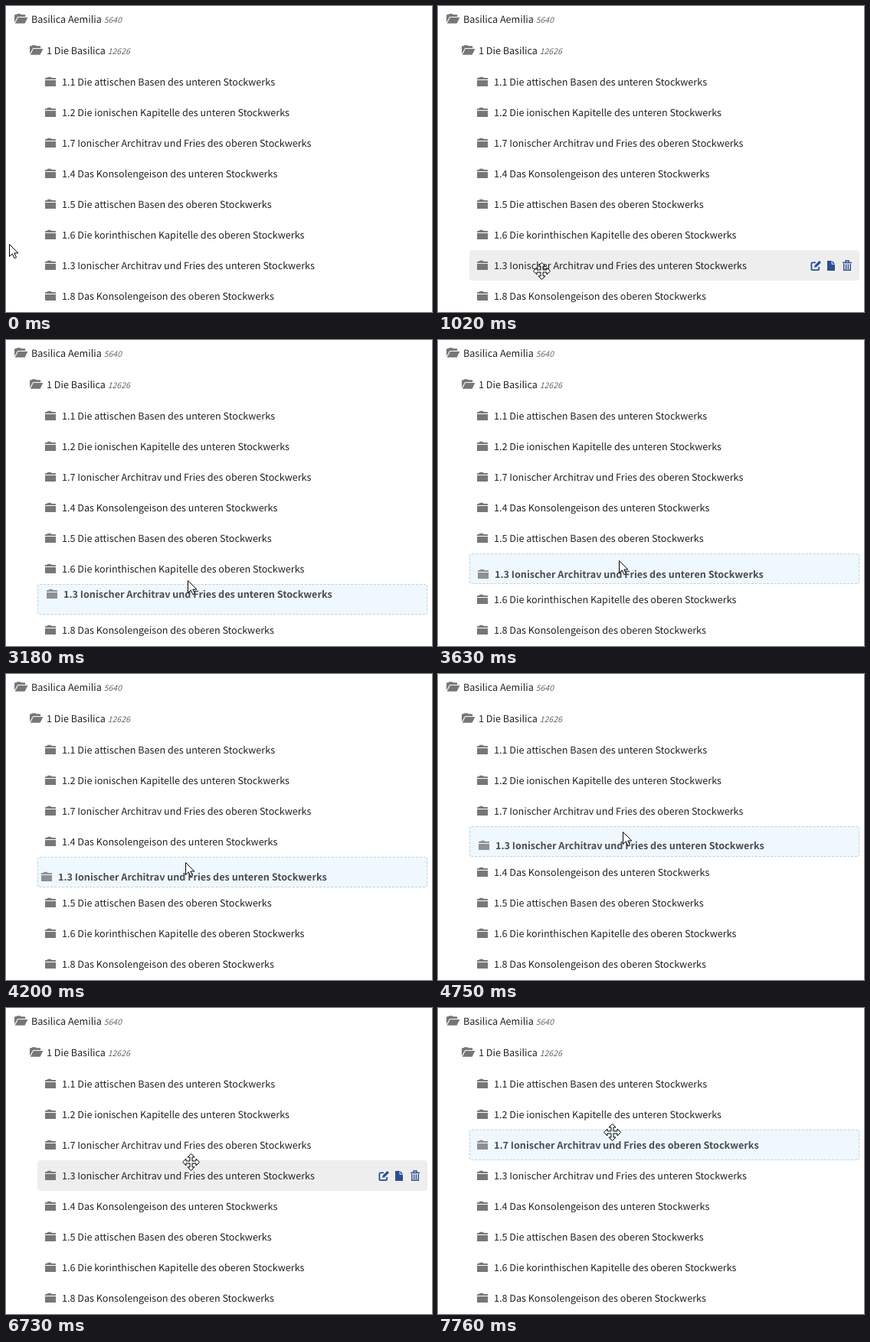
These frames come from a looping animation (556 by 400 pixels, 8000 ms). An HTML page:

```html
<!DOCTYPE html>
<html lang="de">
<head>
<meta charset="utf-8">
<title>Tree sorting</title>
<style>
html, body { margin: 0; width: 100%; height: 100%; overflow: hidden; background: #fff; }
svg { display: block; }
text {
  font: 12.6px "Noto Sans CJK JP", "Noto Sans CJK SC", "Noto Sans CJK", sans-serif;
  fill: #222; text-rendering: geometricPrecision; white-space: pre;
}
.count { font-size: 10.5px; font-style: italic; fill: #666; }
.drag { opacity: .8; }
.drag text { font-weight: 700; }
.folder { fill: #777; }
.hover { fill: #eee; }
.drop {
  box-sizing: border-box; height: 40px; background: #f0f8ff;
  border: 1px dashed #bed2db; border-radius: 3px;
}
.tools { fill: #2b4f91; }
.tools .line { fill: none; stroke: #2b4f91; }
.pointer { fill: #fff; stroke: #000; }
</style>
</head>
<body>
<svg width="556" height="400" viewBox="0 0 556 400">
  <defs>
    <path id="open" class="folder" d="M0 11.5V2.2q0-.9.9-.9H2.2L3.4.2H7.6L8.8 1.3h4.4q1 0 1 1V4h-10zM.8 12.7 4.8 5H17.4l-3.8 7.7z"/>
    <path id="closed" class="folder" d="M0 4V2.7q0-.8.8-.8H2.4L3.5.8h4L8.6 1.9h4.6q.8 0 .8.8V4zM0 5H14v8H0z"/>
    <g id="tools" class="tools">
      <path class="line" stroke-width="1.8" d="M493 16.4h-4q-1.6 0-1.6 1.6v6.6q0 1.6 1.6 1.6h6.6q1.6 0 1.6-1.6V22"/>
      <path d="M491 22.8l.7-2.9 6-6 2.3 2.3-6 6z"/>
      <path d="M508 14h5.6v4.8h4.4V27h-10zM514.6 14l3.4 3.8h-3.4z"/>
      <path class="line" stroke-width="1.4" d="M528 16.5h12M532 16v-2h4v2M529.7 18v8.3h8.6V18M532.6 18.5v6.5M535.4 18.5v6.5"/>
    </g>
    <path id="arrow" class="pointer" d="M.5.5v16l3.8-3.6 2.6 5.8 2.6-1.1-2.6-5.6h4.9z"/>
    <path id="move" class="pointer" d="M.5-10.5l4.5 4.5h-3v5h5v-3l4.5 4.5-4.5 4.5v-3h-5v5h3l-4.5 4.5-4.5-4.5h3v-5h-5v3l-4.5-4.5 4.5-4.5v3h5v-5h-3z"/>
  </defs>
  <use href="#open" x="11" y="10"/>
  <text x="33" y="22">Basilica Aemilia <tspan class="count">5640</tspan></text>
  <use href="#open" x="31" y="51"/>
  <text x="53" y="63">1 Die Basilica <tspan class="count">12626</tspan></text>
  <g id="list"></g>
</svg>
<script>
const LOOP = 8000, TOP = 79, ROW = 40, INDENT = 73;
const before = [
  '1.1 Die attischen Basen des unteren Stockwerks',
  '1.2 Die ionischen Kapitelle des unteren Stockwerks',
  '1.7 Ionischer Architrav und Fries des oberen Stockwerks',
  '1.4 Das Konsolengeison des unteren Stockwerks',
  '1.5 Die attischen Basen des oberen Stockwerks',
  '1.6 Die korinthischen Kapitelle des oberen Stockwerks',
  '1.3 Ionischer Architrav und Fries des unteren Stockwerks',
  '1.8 Das Konsolengeison des oberen Stockwerks'
];
const after = reorder(before, 6, 3);

// pointer stops: time, x, y
const stops = [
  [470, 4, 311], [1260, 172, 356], [1980, 238, 326], [2970, 238, 326],
  [3630, 236, 288], [3810, 236, 258], [4200, 234, 246.4], [4750, 241, 206],
  [5040, 241, 201], [6730, 241, 201], [7270, 227, 162], [LOOP, 227, 162]
];

function reorder(items, from, to) {
  const out = items.filter((_, i) => i !== from);
  out.splice(to, 0, items[from]);
  return out;
}

const progress = (t, from, to) => Math.min(1, Math.max(0, (t - from) / (to - from)));
const smooth = k => k * k * (3 - 2 * k);

// Free moves are eased, dragging runs evenly from stop to stop.
function pointerAt(t, dragging) {
  const i = Math.max(1, stops.findIndex(s => s[0] > t));
  const [t0, x0, y0] = stops[i - 1], [t1, x1, y1] = stops[i];
  const k = progress(t, t0, t1), e = dragging ? k : smooth(k);
  return [x0 + (x1 - x0) * e, y0 + (y1 - y0) * e];
}

const rowTop = i => TOP + i * ROW;
const use = (id, x, y) => `<use href="#${id}" x="${x}" y="${y}"/>`;
const item = (name, x, y) =>
  use('closed', x - 22, y - 7) + `<text x="${x}" y="${y + 5}">${name}</text>`;
const row = (name, i) => item(name, INDENT, rowTop(i) + ROW / 2);

function render(t) {
  const firstDrag = t >= 2800 && t < 5300;
  const moving = t >= 3000 && t < 5300;
  const dragging = firstDrag || t >= 7760;
  const names = t < 5300 ? before : after;
  const [px, py] = pointerAt(t, firstDrag);
  const x = Math.round(px), y = Math.round(py);
  let html = '';

  if (dragging) {
    const held = firstDrag ? 6 : 2;
    const slot = Math.floor((py - TOP + ROW / 2) / ROW);
    html += `<foreignObject x="41" y="${rowTop(slot)}" width="509" height="40"><div class="drop"></div></foreignObject>`;
    reorder(names, held, slot).forEach((name, i) => {
      if (i !== slot) html += row(name, i);
    });
    // The label hangs below the pointer and slips a little to the left.
    const slip = 162 + 4 * progress(t, 3630, 4200);
    const label = moving
      ? item(names[held], Math.round(px - slip), Math.round(py + 18.4))
      : row(names[held], held);
    html += `<g class="drag">${label}</g>`;
  } else {
    const dropped = t >= 5300 && t < 5330;
    if (x >= 41 && !dropped) {
      const top = rowTop(Math.floor((py - TOP) / ROW));
      html += `<rect class="hover" x="41" y="${top}" width="509" height="40" rx="4"/>` + use('tools', 0, top);
    }
    html += names.map(row).join('');
  }

  const arrow = x < 41 || (t >= 3000 && t < 5330);
  list.innerHTML = html + use(arrow ? 'arrow' : 'move', x, y);
}

const list = document.getElementById('list');
const start = performance.now();
function tick() {
  render((performance.now() - start) % LOOP);
  requestAnimationFrame(tick);
}
tick();
</script>
</body>
</html>
```
